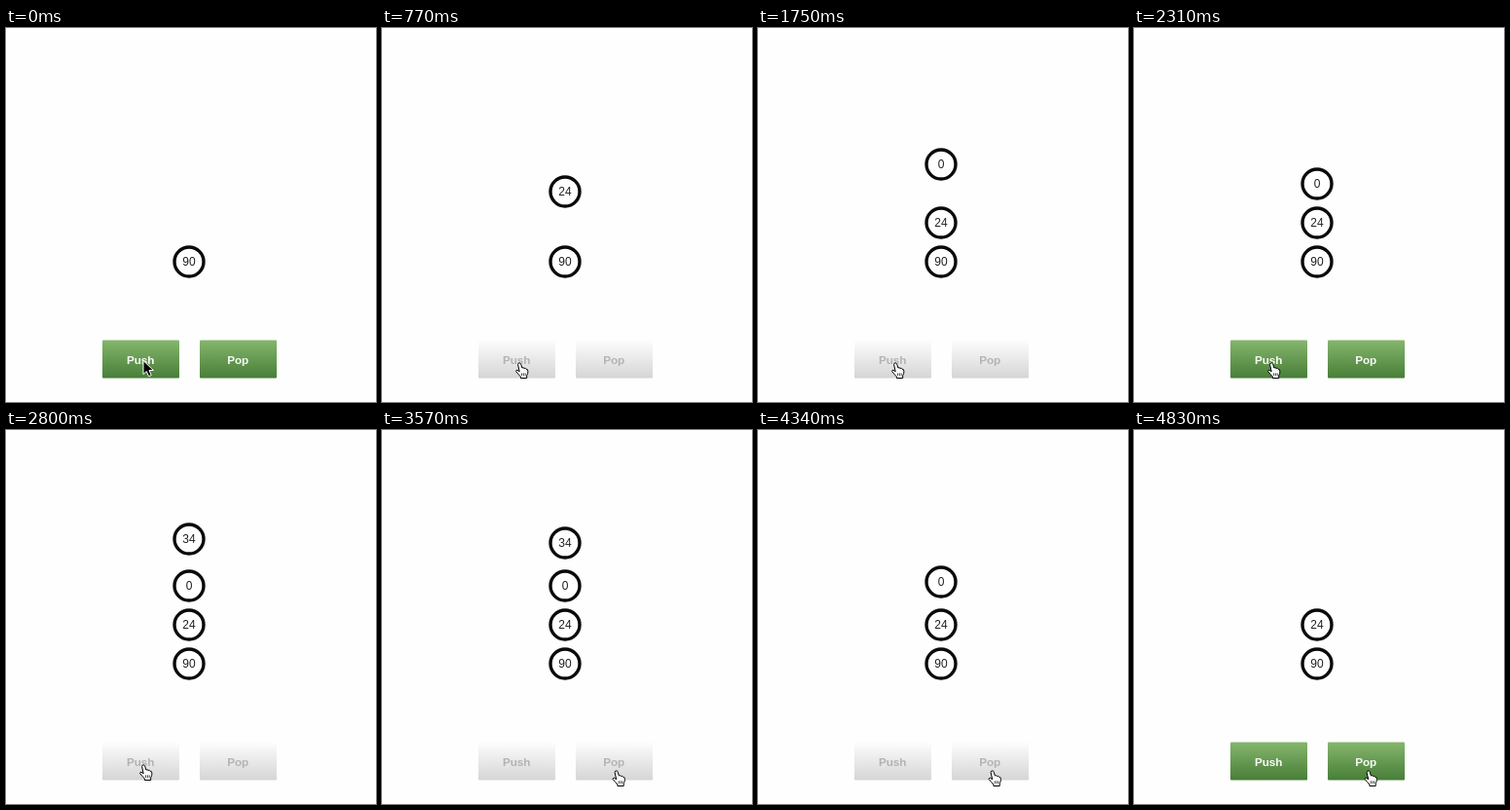
Recreate the animation shown at these times as an HTML page. Size 380 by 384 pixels, loop 4900 ms.

```html
<!DOCTYPE html>
<html lang="en">
<head>
<meta charset="utf-8">
<title>Stack push and pop</title>
<style>
  html, body { margin: 0; width: 100%; height: 100%; overflow: hidden; background: #fefefe; }
  svg { display: block; width: 380px; height: 384px; }
  text { font-family: "Liberation Sans", Arial, sans-serif; text-anchor: middle; }
  .node circle { fill: #fff; stroke: #0a0a0a; stroke-width: 3.4; }
  .node text { font-size: 12px; fill: #222; }
  .button rect { fill: url(#green); }
  .button text { font-size: 11.7px; font-weight: bold; fill: #f7fbf5; }
  .busy .button rect { fill: url(#grey); }
  .busy .button text { fill: #b3b3b3; }
</style>
</head>
<body>
<svg viewBox="0 0 380 384">
  <defs>
    <linearGradient id="green" x2="0" y2="1">
      <stop stop-color="#85b66d"/><stop offset="1" stop-color="#487e38"/>
    </linearGradient>
    <linearGradient id="grey" x2="0" y2="1">
      <stop stop-color="#fdfdfd"/><stop offset="1" stop-color="#d5d5d5"/>
    </linearGradient>
  </defs>
  <g id="nodes"></g>
  <g id="buttons">
    <g class="button"><rect x="99" y="320.5" width="79" height="39" rx="1"/><text x="138.2" y="345">Push</text></g>
    <g class="button"><rect x="199" y="320.5" width="79" height="39" rx="1"/><text x="238.2" y="345">Pop</text></g>
  </g>
  <path id="arrow" d="M0 0V14L3.3 11L5.6 16.2L8.2 15L6 10H10.4Z" fill="#000" stroke="#fff"/>
  <g id="hand" fill="#fff" stroke="#000" stroke-linejoin="round">
    <path d="M2.6 2.6Q3 .5 4.5 .8Q5.3 1 5.7 2.2L6.9 6Q8.2 5.2 9 6.4Q10.4 5.8 11 7.2Q12.7 7 12.9 9.2Q13 12 11.7 13.8V16.5H5.4V15Q3 12.5.6 9.6Q.6 8 2.2 8.3L4.2 9.8Z"/>
    <path d="M6.6 11.3V14M8.4 11.3V14M10.2 11.3V14" stroke-width=".7"/>
  </g>
</svg>
<script>
const LOOP = 4900, FRAME = 70;
const TICK = 48, STEP = 4, TRAVEL = 40, BUSY = 545;
const $ = id => document.getElementById(id);

// Values from the bottom of the stack up, with their push and pop times.
const nodes = [
  { value: 90, push: -Infinity, pop: Infinity },
  { value: 24, push: 651, pop: Infinity },
  { value: 0, push: 1475, pop: 4284 },
  { value: 34, push: 2380, pop: 3480 }
];

nodes.forEach((node, i) => {
  node.home = 240 - 40 * i;
  $('nodes').insertAdjacentHTML('beforeend',
    `<g class="node"><circle r="15"/><text y="4.2">${node.value}</text></g>`);
  node.el = $('nodes').lastChild;
});

const place = (el, x, y) => el.setAttribute('transform', `translate(${x} ${y})`);
const show = (el, on) => el.style.display = on ? '' : 'none';
const shift = dt => Math.max(0, Math.min(TRAVEL, STEP * Math.floor(dt / TICK)));
const running = (t, start) => t >= start && t < start + BUSY;

function drawCursor(t) {
  const p = Math.max(0, Math.min(1, (t - 2900) / 460));
  const e = p * p * (3 - 2 * p);
  const x = 137 + 99.5 * e, y = 343 + 6 * e;
  const tip = x + 4;
  const onButton = t >= FRAME && (tip < 178 || tip > 199);
  place($('hand'), x, y);
  place($('arrow'), tip, y - 1.5);
  show($('hand'), onButton);
  show($('arrow'), !onButton);
}

function draw(now) {
  const t = Math.floor(now % LOOP / FRAME) * FRAME;
  for (const { el, home, push, pop } of nodes) {
    const up = shift(t - pop);
    show(el, t >= push && up < TRAVEL);
    place(el, 188, home - TRAVEL + shift(t - push) - up);
  }
  const busy = nodes.some(n => running(t, n.push) || running(t, n.pop));
  $('buttons').classList.toggle('busy', busy);
  drawCursor(t);
}

let start;
function loop(now) {
  start ??= now;
  draw(now - start);
  requestAnimationFrame(loop);
}
draw(0);
requestAnimationFrame(loop);
</script>
</body>
</html>
```
